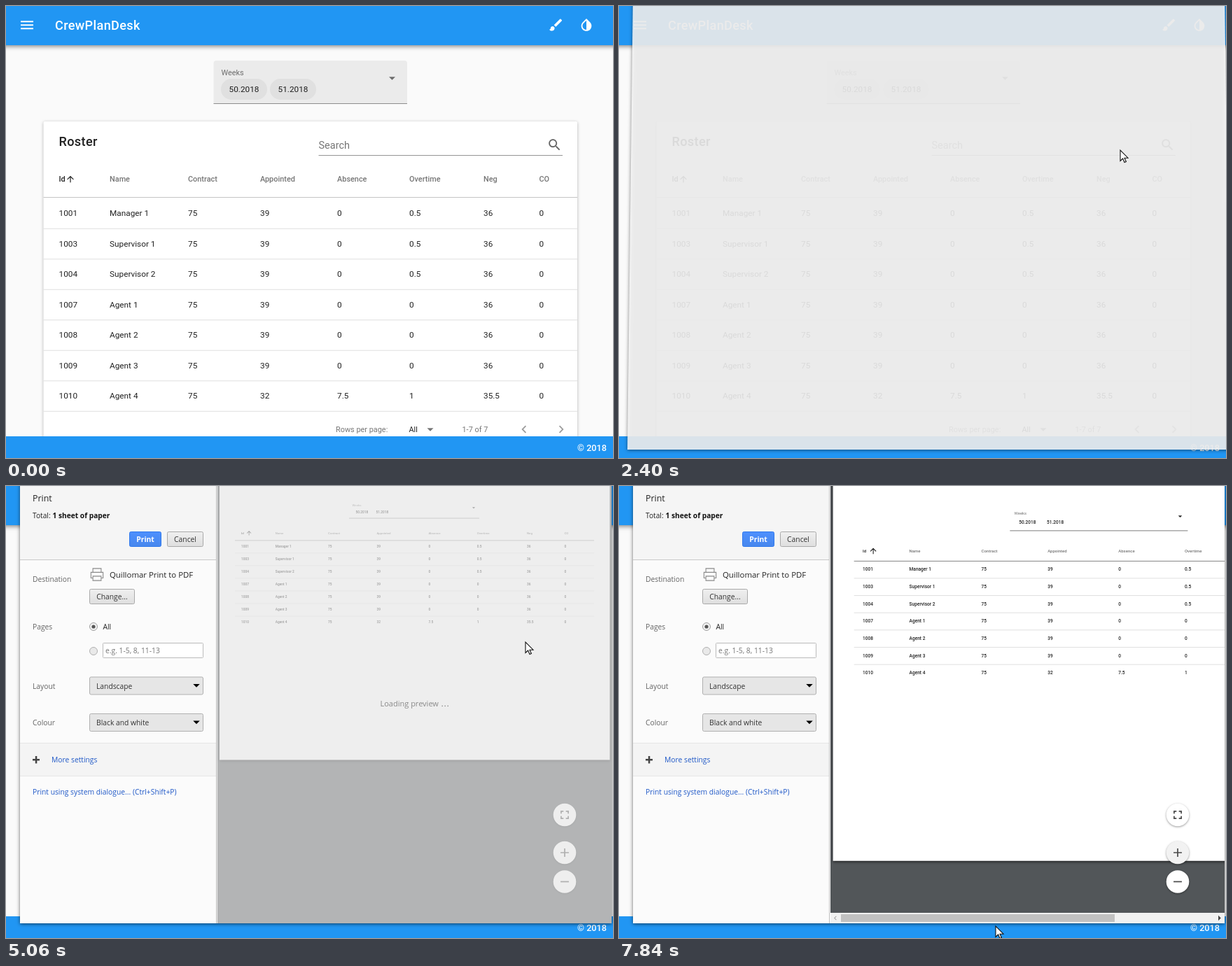
Animation of 867x646 px, one loop 8 s. Source, as an HTML page with a canvas:

```html
<!DOCTYPE html>
<html lang="en">
<head>
<meta charset="utf-8">
<title>Roster printing</title>
<style>
html, body { margin: 0; width: 867px; height: 646px; overflow: hidden; }
canvas { display: block; }
</style>
</head>
<body>
<canvas id="stage" width="867" height="646"></canvas>
<script>
const g = document.getElementById('stage').getContext('2d');
const LOOP = 8000;
const BLUE = '#2196f3', INK = 'rgba(0,0,0,.87)', SOFT = 'rgba(0,0,0,.54)', LINK = '#1f58c7';

const roboto = (px, weight = 400) => `${weight} ${px}px Roboto, sans-serif`;
const ui = (px = 10.3, weight = 400) => `${weight} ${px}px "Open Sans", sans-serif`;

const ICONS = {
  menu: 'M3 18h18v-2H3zm0-5h18v-2H3zm0-7v2h18V6z',
  brush: 'M7 14c-1.66 0-3 1.34-3 3 0 1.31-1.16 2-2 2 .92 1.22 2.49 2 4 2 2.21 0 4-1.79 4-4 0-1.66-1.34-3-3-3zm13.71-9.37l-1.34-1.34c-.39-.39-1.02-.39-1.41 0L9 12.25 11.75 15l8.96-8.96c.39-.39.39-1.02 0-1.41z',
  drop: 'M17.66 7.93L12 2.27 6.34 7.93c-3.12 3.12-3.12 8.19 0 11.31C7.9 20.8 9.95 21.58 12 21.58s4.1-.78 5.66-2.34c3.12-3.12 3.12-8.19 0-11.31zM12 19.59c-1.6 0-3.11-.62-4.24-1.76C6.62 16.69 6 15.19 6 13.59s.62-3.11 1.76-4.24L12 5.1z',
  search: 'M15.5 14h-.79l-.28-.27C15.41 12.59 16 11.11 16 9.5 16 5.91 13.09 3 9.5 3S3 5.91 3 9.5 5.91 16 9.5 16c1.61 0 3.09-.59 4.23-1.57l.27.28v.79l5 4.99L20.49 19zm-6 0C7.01 14 5 11.99 5 9.5S7.01 5 9.5 5 14 7.01 14 9.5 11.99 14 9.5 14z',
  up: 'M4 12l1.41 1.41L11 7.83V20h2V7.83l5.58 5.59L20 12l-8-8z',
  down: 'M7 10l5 5 5-5z',
  prev: 'M15.41 7.41L14 6l-6 6 6 6 1.41-1.41L10.83 12z',
  next: 'M10 6L8.59 7.41 13.17 12l-4.58 4.59L10 18l6-6z',
  full: 'M7 14H5v5h5v-2H7zm-2-4h2V7h3V5H5zm12 7h-3v2h5v-5h-2zM14 5v2h3v3h2V5z',
  plus: 'M19 13h-6v6h-2v-6H5v-2h6V5h2v6h6z',
  minus: 'M19 13H5v-2h14z',
  printer: 'M5 8V2h14v6h3v10h-3v4H5v-4H2V8zM6.2 8h11.6V3.2H6.2zM3.2 9.2v7.6H5V14h14v2.8h1.8V9.2zM6.2 15.2v5.6h11.6v-5.6z',
  arrow: 'M0 0V15.5L3.6 12 6 17.5 8.4 16.5 6 11.2H11Z',
  hand: 'M-1.5 10V1.5Q-1.5 0 0 0T1.5 1.5V6.5L3 6Q4.5 6 4.5 7.5Q7 6.6 7.3 8.4Q9.5 8 9.5 10V13Q9.5 16 8 17.5V19.5H0V17.5L-5 11.5Q-6 9.5-4 9.5Q-2.5 9.7-1.5 12Z'
};
for (const name in ICONS) ICONS[name] = new Path2D(ICONS[name]);

function layer(draw) { g.save(); draw(); g.restore(); }

function rect(x, y, w, h, color) {
  g.fillStyle = color;
  g.fillRect(x, y, w, h);
}

function round(x, y, w, h, r, fill, stroke) {
  g.beginPath();
  g.roundRect(x, y, w, h, r);
  if (fill) { g.fillStyle = fill; g.fill(); }
  if (stroke) { g.strokeStyle = stroke; g.lineWidth = 1; g.stroke(); }
}

function disc(x, y, r, fill, stroke) { round(x - r, y - r, 2 * r, 2 * r, r, fill, stroke); }

function shadow(color, blur, dy = 0) {
  g.shadowColor = color;
  g.shadowBlur = blur;
  g.shadowOffsetY = dy;
}

function text(s, x, y, font, color = INK, align = 'left', spacing = 0) {
  g.font = font;
  g.fillStyle = color;
  g.textAlign = align;
  g.letterSpacing = spacing + 'px';
  g.fillText(s, x, y);
}

// Icons live on a 24-unit grid centred on (x, y).
function icon(name, x, y, scale, color, scaleY = scale) {
  layer(() => {
    g.translate(x, y);
    g.scale(scale, scaleY);
    g.translate(-12, -12);
    g.fillStyle = color;
    g.fill(ICONS[name], 'evenodd');
  });
}

const HEADS = ['Id', 'Name', 'Contract', 'Appointed', 'Absence', 'Overtime', 'Neg', 'CO'];
const COLS = [0, 72.5, 184.5, 287.5, 397.5, 500.5, 606.5, 686];
const ROWS = [[1001, 'Manager 1'], [1003, 'Supervisor 1'], [1004, 'Supervisor 2'], [1007, 'Agent 1'],
  [1008, 'Agent 2'], [1009, 'Agent 3'], [1010, 'Agent 4']].map(([id, name], i) =>
  [id, name, 75, ...(i < 6 ? [39, 0, i < 3 ? 0.5 : 0, 36, 0] : [32, 7.5, 1, 35.5, 0])]);

function table(o) {
  const colX = i => o.x + COLS[i] * o.k;
  HEADS.forEach((h, i) => text(h, colX(i), o.head + o.px * .33, roboto(o.headPx, 500), i ? SOFT : INK));
  icon('up', o.x + 16.5 * o.k, o.head, .6 * o.k, INK);
  rect(o.left, o.rule, o.right - o.left, o.line, o.ruleColor);
  ROWS.forEach((row, r) => {
    const y = o.row + r * o.pitch;
    row.forEach((v, i) => text(v, colX(i), y + o.px * .35, roboto(o.px, o.weight)));
    if (r < o.lines) rect(o.left, y + o.pitch / 2, o.right - o.left, o.line, '#e0e0e0');
  });
}

function drawApp() {
  rect(0, 0, 867, 646, '#fafafa');
  round(296.5, 78, 276.5, 62, [4, 4, 0, 0], '#ebebeb');
  rect(296.5, 139, 276.5, 1, '#8c8c8c');
  text('Weeks', 307.5, 99, roboto(10.9), SOFT);
  ['50.2018', '51.2018'].forEach((week, i) => {
    round(307 + 70 * i, 104, 66, 30, 15, '#e0e0e0');
    text(week, 340 + 70 * i, 123, roboto(11.8), INK, 'center');
  });
  icon('down', 551.5, 103, .9, SOFT);

  layer(() => { shadow('rgba(0,0,0,.3)', 4, 1); round(53.5, 165, 762.5, 500, 2, '#fff'); });
  text('Roster', 75.5, 200, roboto(18.1, 500), INK, 'left', .36);
  text('Search', 446.5, 203.5, roboto(14.5), SOFT);
  rect(446.5, 213, 348.5, 1, '#949494');
  icon('search', 783.5, 198.5, .92, '#666');
  table({ x: 75.5, k: 1, left: 53.5, right: 816, head: 247.5, rule: 273, ruleColor: '#c4c4c4', row: 296,
    pitch: 43.5, px: 11.8, headPx: 10.9, weight: 400, line: 1, lines: 7 });
  text('Rows per page:', 471, 609, roboto(10.9), SOFT);
  text('All', 575.5, 609, roboto(10.9));
  icon('down', 606, 605, .9, SOFT);
  text('1-7 of 7', 651.5, 609, roboto(10.9), SOFT);
  icon('prev', 740, 605, .9, '#9c9c9c');
  icon('next', 793, 605, .9, '#9c9c9c');

  rect(0, 615, 867, 31, BLUE);
  text('© 2018', 858, 636, roboto(12.7, 500), '#fff', 'right');
  layer(() => { shadow('rgba(0,0,0,.45)', 6, 2); rect(-10, 0, 887, 56, BLUE); });
  icon('menu', 30, 27.3, 1, '#fff');
  text('CrewPlanDesk', 70, 33.5, roboto(18.1, 500), '#fff', 'left', .36);
  icon('brush', 785.5, 27, .95, '#fff');
  icon('drop', 829, 27, .92, '#fff');
}

const MENU = [['New tab', 48.5, 'Ctrl+T'], ['New window', 69.5, 'Ctrl+N'], ['History', 100], ['Downloads', 121, 'Ctrl+J'],
  ['Bookmarks', 142], ['Print...', 203, 'Ctrl+P'], ['Cast...', 224], ['Find...', 245, 'Ctrl+F'], ['More tools', 266],
  ['Settings', 327.5], ['Help', 348.5], ['Exit', 379]];

function drawMenu(cur) {
  layer(() => { shadow('rgba(0,0,0,.55)', 5, 3); g.shadowOffsetX = 3; rect(650, -10, 230, 401, '#fff'); });
  g.strokeStyle = '#b4b4b4';
  g.lineWidth = 1;
  g.strokeRect(649.5, -10, 240, 401.5);
  round(680, 5, 13, 14, 0, '#c4162c');
  disc(715, 12, 7.5, '#ee8a35');
  round(737, 5, 14, 12, 0, '#bdbdbd');
  disc(773, 12, 6.5, '#7d0d18');
  for (const y of [33, 83, 156, 187, 281, 311, 363]) rect(650, y, 217, 1, '#e4e4e4');
  for (const [label, y, keys] of MENU) {
    if (cur.x < 867 && Math.abs(cur.y - y) < 10.4) rect(650, y - 11, 217, 21, '#ebebeb');
    text(label, 679, y + 4, ui(), '#111');
    if (keys) text(keys, 858, y + 4, ui(), '#111', 'right');
  }
  text('Zoom', 679, 177.5, ui(), '#111');
  ['-', '100%', '+'].forEach((s, i) => text(s, 745 + 33 * i, 176.5, ui(), '#111', 'center'));
  for (const x of [728, 829]) rect(x, 157, 1, 30, '#e4e4e4');
  icon('full', 854, 172, 1.15, '#555', .9);
  text('Edit', 679, 301, ui(), '#111');
  ['Cut', 'Copy', 'Paste'].forEach((s, i) => text(s, 748 + 52.5 * i, 300.5, ui(), '#111', 'center'));
  for (const x of [722, 775, 827]) rect(x, 282, 1, 29, '#e4e4e4');
}

function button(x, y, w, label, kind = 'plain') {
  const fill = g.createLinearGradient(0, y, 0, y + 22);
  const [top, bottom, edge, ink] = {
    plain: ['#f0f0f0', '#dedede', '#a9a9a9', '#333'],
    primary: ['#4d90fe', '#4787ed', '#3079ed', '#fff'],
    disabled: ['#f1f1f1', '#e9e9e9', '#cfcfcf', '#aaa']
  }[kind];
  fill.addColorStop(0, top);
  fill.addColorStop(1, bottom);
  round(x + .5, y + .5, w - 1, 21, 2, fill, edge);
  text(label, x + w / 2, y + 15, ui(10.3, kind === 'plain' ? 400 : 700), ink, 'center');
}

function select(label, value, y) {
  text(label, 38, y + 4, ui(), '#646464');
  round(119.5, y - 12.5, 162, 25, 2, '#e6e6e6', '#b0b0b0');
  text(value, 129, y + 4, ui(), '#333');
  icon('down', 272, y - .5, .95, '#000');
}

function drawSettings() {
  text('Pages', 38, 205, ui(), '#646464');
  disc(125, 201, 5.5, '#f3f3f3', '#a0a0a0');
  disc(125, 201, 2.6, '#555');
  text('All', 138.5, 205, ui(), '#222');
  disc(125, 236, 5.5, '#e9e9e9', '#b0b0b0');
  round(138.5, 224.5, 143, 21, 1, '#fff', '#bbb');
  text('e.g. 1-5, 8, 11-13', 142, 239, ui(), '#757575');
  select('Layout', 'Landscape', 285.5);
  select('Colour', 'Black and white', 338);
  rect(20, 367, 281, 48, '#f4f4f4');
  rect(20, 367, 281, 1, '#e6e6e6');
  rect(20, 414, 281, 1, '#e6e6e6');
  rect(38, 390, 10, 2.5, '#444');
  rect(41.8, 386, 2.5, 10.5, '#444');
  text('More settings', 65, 395, ui(), LINK);
}

function drawSidebar(t) {
  const ready = t >= 3800;
  rect(20, 0, 281, 625, '#fbfbfb');
  rect(20, 0, 281, 105, '#f5f5f5');
  rect(20, 105, 281, 1, '#c9c9c9');
  text('Print', 38, 21.5, ui(12.4), '#222');
  text('Destination', 38, 137, ui(), '#646464');
  button(119, 147, 65, 'Change...');
  if (!ready) {
    button(176, 65, 53, 'Cancel');
    button(237, 65, 45, 'Print', 'disabled');
  } else {
    button(176, 65, 46, 'Print', 'primary');
    button(230, 65, 52, 'Cancel');
    icon('printer', 130, 126.5, .92, '#8a8a8a');
    text('Quillomar Print to PDF', 148, 131.3, ui(11.4), '#222');
    if (t >= 4200) {
      text('Total:', 38, 46, ui(10.2), '#222');
      text('1 sheet of paper', 66.5, 46, ui(10.2, 700), '#111');
    }
  }
  const p = Math.min(1, Math.max(0, (t - 3800) / 400));
  const linkY = 208 + 233 * (1 - (1 - p) ** 2);
  layer(() => {
    g.beginPath();
    g.rect(20, 180, 281, linkY - 206);
    g.clip();
    drawSettings();
  });
  text('Print using system dialogue... (Ctrl+Shift+P)', 38, linkY, ui(), LINK);
  rect(300, 0, 1, 625, '#bdbdbd');
}

function drawSheet() {
  layer(() => { shadow('rgba(0,0,0,.7)', 4, 1); rect(305, -60, 557.5, 451.5, '#fff'); });
  text('Weeks', 494.5, 29, roboto(4.4), SOFT);
  text('50.2018', 499.5, 39, roboto(4.8, 500));
  text('51.2018', 528.5, 39, roboto(4.8, 500));
  icon('down', 668, 31, .4, INK);
  rect(490, 45.7, 186, .7, '#777');
  table({ x: 336, k: .6727, left: 327, right: 840, head: 67.3, rule: 77.5, ruleColor: '#888', row: 86.4,
    pitch: 18.05, px: 4.8, headPx: 4.4, weight: 500, line: .75, lines: 6 });
}

function drawPreview(t, cur) {
  const zoomed = t >= 6700;
  rect(302, 0, 563, 625, '#525659');
  layer(() => {
    if (zoomed) { g.translate(-111, 1); g.scale(1.366, 1.366); }
    drawSheet();
  });
  [['full', 470], ['plus', 524], ['minus', 565.5]].forEach(([name, y]) => {
    layer(() => {
      shadow('rgba(0,0,0,.4)', 3, 1);
      disc(798, y, 16.3, name === 'plus' && (zoomed || onPlus(cur)) ? '#f2f2f2' : '#fff');
    });
    icon(name, 798, y, .85, '#4a4a4a');
  });
  if (!zoomed) return;
  const hot = cur.y > 608 && cur.y < 625;
  rect(302, 610, 563, 15, '#f1f1f1');
  rect(317, 612, 391, 11, hot ? '#a8a8a8' : '#c1c1c1');
  icon('prev', 309, 617.5, .5, '#a3a3a3');
  icon('down', 0, 0, 0, '#000');
  layer(() => { g.translate(857.5, 617.5); g.rotate(-Math.PI / 2); icon('down', 0, 0, .75, '#444'); });
}

function drawLoading(t) {
  rect(301, 0, 564, 625, '#e6e6e6');
  const early = t < 3810;
  text('Loading preview', early ? 532 : 534.5, 315, ui(early ? 11.3 : 11), '#555');
  const dots = early ? 3 : Math.min(3, 1 + Math.floor((t - 3810) % 720 / 150));
  for (let i = 0; i < dots; i++) rect((early ? 623 : 622.5) + (early ? 4.8 : 4) * i, 313.7, 1.4, 1.4, '#555');
}

function drawDialog(t, cur) {
  const p = Math.min(1, (t - 2240) / 250);
  const left = (1 - p) ** 1.8, lean = 57 * left;
  layer(() => {
    g.globalAlpha = 1 - left;
    shadow('rgba(0,0,0,.6)', 5, 1);
    g.beginPath();
    g.moveTo(20, -20);
    g.lineTo(865, -20);
    g.lineTo(865 + lean * .9, 625 + lean);
    g.lineTo(20 - lean * .9, 625 + lean);
    g.fillStyle = '#fff';
    g.fill();
  });
  if (t < 2860) return;
  drawSidebar(t);
  layer(() => {
    g.beginPath();
    g.rect(301, 0, 564, 625);
    g.clip();
    if (t >= 4990) drawPreview(t, cur);
    g.globalAlpha = t < 4990 ? 1 : t < 5060 ? .9 : t < 5140 ? .66 : 0;
    if (g.globalAlpha) drawLoading(t);
  });
}

// Pointer route: time, x, y
const ROUTE = [[0, 770, 670], [200, 777, 652], [500, 812, 260], [760, 869, 25], [1430, 869, 6], [1700, 735, 141],
  [1930, 716, 206], [2860, 716, 206], [3100, 730, 247], [3570, 742, 223], [5800, 742, 223], [6380, 794.5, 531],
  [6700, 794.5, 531], [7230, 600, 330], [7480, 600, 330], [7840, 538, 629], [LOOP, 538, 629]];

function pointer(t) {
  const i = ROUTE.findIndex(k => k[0] > t);
  const [t0, x0, y0] = ROUTE[i - 1], [t1, x1, y1] = ROUTE[i];
  const p = (t - t0) / (t1 - t0), e = p * p * (3 - 2 * p);
  return { x: x0 + (x1 - x0) * e, y: y0 + (y1 - y0) * e };
}

function onPlus(cur) { return Math.hypot(cur.x - 798, cur.y - 524) < 16; }

function drawPointer(t, cur) {
  const shape = ICONS[t > 5140 && onPlus(cur) ? 'hand' : 'arrow'];
  layer(() => {
    g.translate(cur.x, cur.y);
    g.fillStyle = '#fff';
    g.strokeStyle = '#111';
    g.lineWidth = 1.1;
    g.fill(shape);
    g.stroke(shape);
  });
}

function frame() {
  const t = performance.now() % LOOP, cur = pointer(t);
  drawApp();
  if (t >= 1140 && t < 2240) layer(() => {
    g.globalAlpha = t < 1230 ? .6 : 1;
    drawMenu(cur);
  });
  if (t >= 2240) drawDialog(t, cur);
  drawPointer(t, cur);
  requestAnimationFrame(frame);
}
frame();
</script>
</body>
</html>
```
